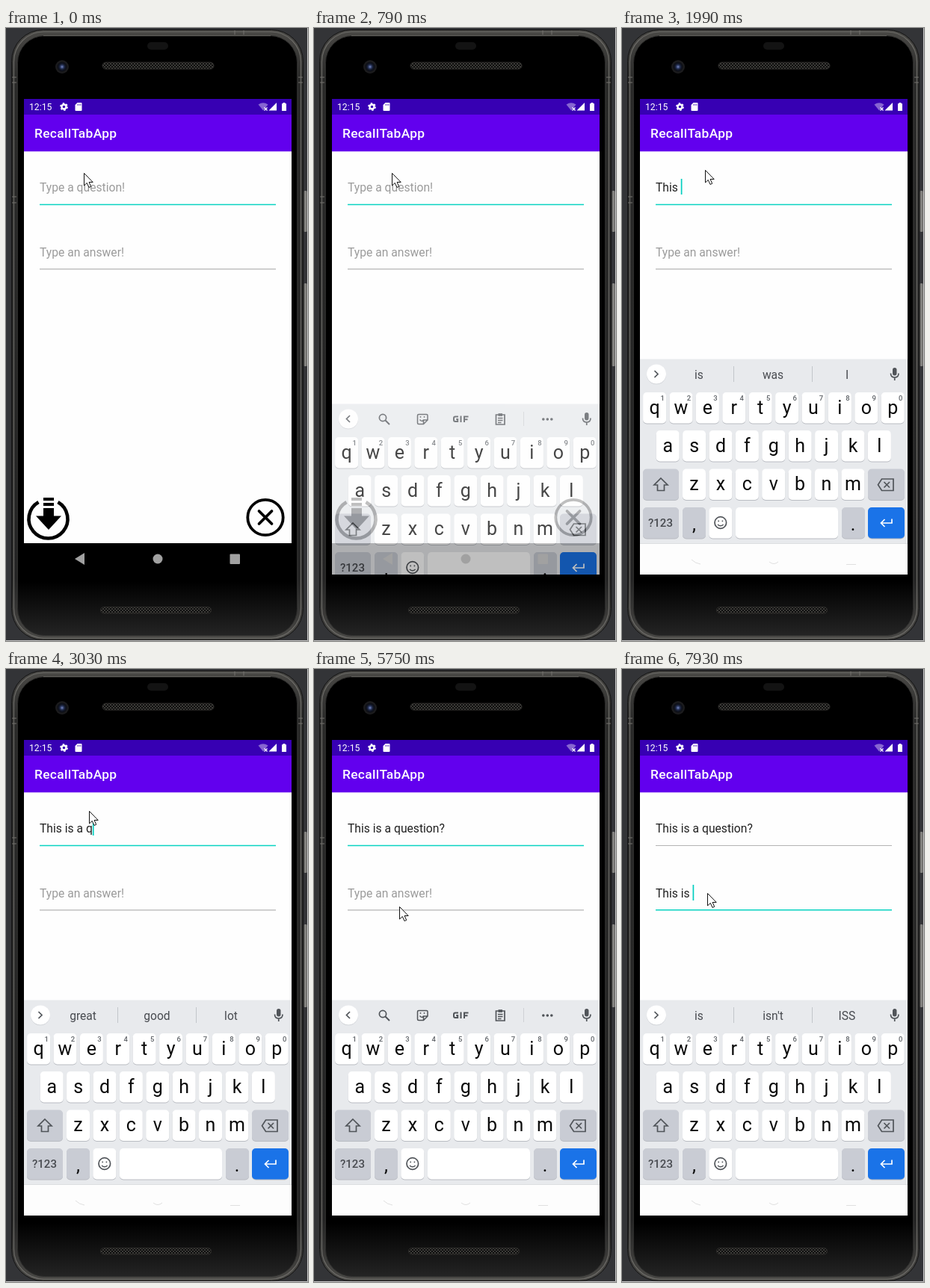
An HTML page for the animation above (8 s loop, 404 by 821 pixels).

```html
<!DOCTYPE html>
<html lang="en">
<head>
<meta charset="utf-8">
<title>Flash card entry</title>
<style>
html, body { margin: 0; width: 100%; height: 100%; overflow: hidden; background: #333437; }
svg { display: block; width: 404px; height: 821px; }
text { font-family: Roboto, "Noto Sans", sans-serif; white-space: pre; }
.field { font-size: 15.68px; }
.key { font-size: 25px; text-anchor: middle; fill: #0a0a0a; }
.digit { font-size: 9.5px; font-weight: 500; text-anchor: middle; fill: #5f6368; }
.word { font-size: 15.6px; text-anchor: middle; fill: #484b50; }
.word.long { font-size: 14px; letter-spacing: -.3px; }
.line { fill: none; stroke: #505459; stroke-width: 1.7; }
</style>
</head>
<body>
<svg viewBox="0 0 404 821">
  <defs>
    <linearGradient id="rim" x2="0" y2="1">
      <stop offset="0" stop-color="#4a4946"/>
      <stop offset=".08" stop-color="#2b2b2a"/>
      <stop offset=".9" stop-color="#252525"/>
      <stop offset="1" stop-color="#4a4946"/>
    </linearGradient>
    <linearGradient id="glass" x2="0" y2="1">
      <stop offset="0" stop-color="#000"/>
      <stop offset=".91" stop-color="#000"/>
      <stop offset="1" stop-color="#242424"/>
    </linearGradient>
    <linearGradient id="button" x2="1" y2="0">
      <stop offset="0" stop-color="#3c3c3b"/>
      <stop offset=".5" stop-color="#8f8e8b"/>
      <stop offset="1" stop-color="#5d5d5b"/>
    </linearGradient>
    <radialGradient id="lens">
      <stop offset="0" stop-color="#7f8fc4"/>
      <stop offset=".3" stop-color="#34426f"/>
      <stop offset=".6" stop-color="#141a2c"/>
      <stop offset="1" stop-color="#0a0b10"/>
    </radialGradient>
    <pattern id="mesh" width="4" height="4" patternUnits="userSpaceOnUse">
      <rect width="4" height="4" fill="#0d0d0d"/>
      <path d="M0 0L4 4M4 0L0 4" stroke="#474642" stroke-width=".8"/>
    </pattern>
    <clipPath id="screen"><rect x="24" y="95" width="358" height="637"/></clipPath>
  </defs>

  <!-- phone -->
  <rect width="404" height="821" fill="#333437"/>
  <g fill="url(#button)">
    <rect x="398" y="218" width="5" height="55" rx="1.5"/>
    <rect x="398" y="342" width="5" height="111" rx="1.5"/>
  </g>
  <rect x="7.5" y="2.5" width="390" height="817" rx="42" fill="url(#rim)" stroke="#131313"/>
  <rect x="10.5" y="5" width="384" height="812" rx="40" fill="none" stroke="#6b6a66" stroke-width="1.2"/>
  <rect x="15.5" y="10.5" width="374" height="803" rx="36" fill="url(#glass)" stroke="#2c2c2b"/>
  <path d="M50 10.500H354" stroke="#5c5b57"/>
  <path d="M8 66h6m-6 7h6M8 226h6m-6 8h6M391 66h6m-6 7h6M306 3v6m12-6v6" stroke="#74736f"/>
  <path d="M403.500 0V820.500H0" fill="none" stroke="#c6c6c6"/>
  <rect x="189" y="19" width="28" height="10" rx="5" fill="#131313"/>
  <circle cx="75" cy="52" r="9" fill="#1b1b1d"/>
  <circle cx="75" cy="52" r="6.5" fill="url(#lens)"/>
  <g fill="url(#mesh)" stroke="#2e2d2b">
    <rect x="129" y="46" width="149" height="9" rx="4.5"/>
    <rect x="126.500" y="775.500" width="148" height="8.500" rx="4.200"/>
  </g>

  <!-- app -->
  <rect x="24" y="95" width="358" height="595" fill="#fefefe"/>
  <rect x="24" y="95" width="358" height="21" fill="#3700b3"/>
  <rect x="24" y="116" width="358" height="49.300" fill="#6200ee"/>
  <g fill="#fff">
    <text x="31" y="110" font-size="12.2">12:15</text>
    <circle cx="77.500" cy="105.500" r="3" fill="none" stroke="#fff" stroke-width="2.400"/>
    <circle cx="77.500" cy="105.500" r="4.600" fill="none" stroke="#fff" stroke-width="1.600" stroke-dasharray="2.400 2.417"/>
    <path d="M95.500 100h5q1 0 1 1v9q0 1-1 1h-7q-1 0-1-1v-7z"/>
    <path d="M95.800 101.800v2m2-2v2m2-2v2" stroke="#3700b3" stroke-width=".8"/>
    <path d="M337.500 102.500q6.500-4.500 13 0l-6.500 8z" opacity=".4"/>
    <path d="M345.500 106.500l4 4m0-4l-4 4" stroke="#fff" stroke-width="1.200"/>
    <path d="M362 100v10.500h-10.500z"/>
    <path d="M370.500 100h3v1.200h1.500v9.800h-6v-9.800h1.500z"/>
    <text x="38" y="147" font-size="17.4" font-weight="500" letter-spacing=".3">RecallTabApp</text>
  </g>
  <g id="fields"></g>
  <g fill="none" stroke="#000">
    <path d="M43.500 635A26 26 0 1 0 69.500 635" stroke-width="4.600"/>
    <circle cx="347" cy="655.500" r="23.700" stroke-width="3.800"/>
    <path d="M338.500 647l17 17m0-17l-17 17" stroke-width="3.800" stroke-linecap="round"/>
  </g>
  <path d="M50 629h14v4h-14zM50 636h14v4h-14zM50 643h14v10.500h10L57 672 40 653.500h10z"/>

  <!-- keyboard -->
  <g clip-path="url(#screen)">
    <g id="board">
      <rect x="24" y="443.500" width="358" height="247" fill="#e8eaed"/>
      <rect x="24" y="690" width="358" height="300" fill="#fdfdfd"/>
      <path d="M24 690.500H382" stroke="#dcdee1"/>
      <path d="M93 712q5 5 12 6M197 715q6 5 12 0M300 718.500h13" fill="none" stroke="#e0e0e0"/>
      <circle cx="46" cy="464.200" r="13" fill="#c9ccd1"/>
      <circle cx="46" cy="463.500" r="13" fill="#fff"/>
      <path id="chevron" class="line"/>
      <g id="tools" class="line">
        <circle cx="92" cy="462" r="4.600"/>
        <path d="M95.500 465.500l5.500 5.500" stroke-width="2"/>
        <path d="M140 457.500h10.500q1.500 0 1.500 1.500v6l-5.500 5.500h-6.500q-1.500 0-1.500-1.500v-10q0-1.500 1.500-1.500zM152 465h-5.500v5.500M141.500 464.500q3 3.500 5 .5M142.500 460v1.800m5-1.800v1.800" stroke-width="1.500"/>
        <path d="M193 460.500h-4q-2 0-2 2v2.500q0 2 2 2h3.200v-3h-2M196.500 459.500v8.500M201 468v-7.500h5.500M201 464.300h4.500" stroke-width="2"/>
        <path d="M243.500 458h11.500v13h-11.500zM246 462.500h6.500m-6.500 3h6.500m-6.500 3h4.500"/>
        <path d="M246.500 458h5.500" stroke-width="3.600"/>
        <path d="M280.500 454v19" stroke="#cfd1d5" stroke-width="1"/>
        <path d="M306.800 464h.01m5.500 0h.01m5.500 0h.01" stroke-width="3.600" stroke-linecap="round"/>
      </g>
      <g id="words">
        <path d="M149.500 453v21m105-21v21" stroke="#c3c6ca"/>
        <text class="word" x="103" y="469.500"></text>
        <text class="word" x="202" y="469.500"></text>
        <text class="word" x="301" y="469.500"></text>
      </g>
      <rect x="362" y="455" width="5.500" height="10.500" rx="2.750" fill="#505459"/>
      <path class="line" d="M359.500 462.500q0 5.500 5.250 5.500t5.250-5.500M364.750 468v4"/>
      <g id="keys"></g>
      <g class="line">
        <path d="M52 603l9 9h-4.500v7.500h-9v-7.500h-4.500z"/>
        <path d="M347.500 604h15.500v15.500h-15.500l-5-7.750zM350.500 608l7.500 7.500m0-7.500l-7.500 7.500"/>
        <circle cx="131.800" cy="662.500" r="7.800"/>
        <path d="M128 665q3.800 3.600 7.600 0M129.200 659.500v1.800m5.200-1.800v1.800" stroke-width="1.500"/>
        <path d="M361 657.500v5.500h-14.500m5-5l-5 5 5 5" stroke="#fff"/>
      </g>
      <text x="51.500" y="668" font-size="15" font-weight="500" text-anchor="middle" fill="#484b50">?123</text>
    </g>
  </g>
  <g id="nav" fill="#a1a1a1">
    <path d="M92 711l13-8v16z"/>
    <circle cx="203" cy="711" r="6.500"/>
    <rect x="299.500" y="704.500" width="13.500" height="13.500" rx="1"/>
  </g>
  <path id="mouse" d="M0 0V16.500L3.800 13 6.500 19 9.200 17.800 6.600 12H11.700Z" fill="#fff" stroke="#111"/>
</svg>
<script>
const LOOP = 8000;
const $ = id => document.getElementById(id);
const pen = document.createElement('canvas').getContext('2d');
const width = s => {
  pen.font = '15.68px Roboto, "Noto Sans", sans-serif';
  return pen.measureText(s).width;
};

function cap(x, y, w, fill = '#fff') {
  return `<rect x="${x}" y="${y + 1}" width="${w}" height="41.500" rx="5" fill="#b9bcc2"/>
    <rect x="${x}" y="${y}" width="${w}" height="41.500" rx="5" fill="${fill}"/>`;
}

function row(letters, cx, y, digits = '') {
  return [...letters].map((c, i) => {
    const x = cx + i * 35.4;
    const digit = digits ? `<text class="digit" x="${x + 10.5}" y="${y + 10.5}">${digits[i]}</text>` : '';
    return cap(x - 15.5, y, 31) + `<text class="key" x="${x}" y="${y + 28.5}">${c}</text>` + digit;
  }).join('');
}

const grey = '#c9ccd4';
$('keys').innerHTML =
  row('qwertyuiop', 43.6, 488, '1234567890') +
  row('asdfghjkl', 61.2, 539) +
  row('zxcvbnm', 96.5, 590.5) +
  cap(28, 590.5, 48, grey) + cap(329, 590.5, 49, grey) +
  cap(28, 642, 48, grey) + cap(81, 642, 31, grey) + cap(116.3, 642, 31) +
  cap(152, 642, 137) + cap(294, 642, 31, grey) + cap(329, 642, 49, '#1a73e8') +
  '<text class="key" x="96.500" y="672.500">,</text><text class="key" x="309" y="672.500">.</text>';

// Each field: text, baseline, rule and composing underline
const fields = [['Type a question!', 218.5, 236.5], ['Type an answer!', 305.5, 322.8]].map(([hint, base, rule]) => {
  const g = document.createElementNS('http://www.w3.org/2000/svg', 'g');
  g.innerHTML = `<text class="field" x="45" y="${base}"></text><path d="M45 ${rule}H361"/>
    <path stroke="#333"/><rect y="${base - 16.5}" width="1.700" height="21" fill="#03cfc0"/>`;
  $('fields').append(g);
  const [text, line, under, caret] = g.children;
  return (value, from, active, blink) => {
    text.textContent = value || hint;
    text.setAttribute('fill', value ? '#212121' : '#9b9b9b');
    line.setAttribute('stroke', active ? '#08d3c1' : '#b4b4b4');
    line.setAttribute('stroke-width', active ? 1.5 : 1.2);
    const end = 45 + width(value);
    const start = 45 + width(value.slice(0, from));
    under.setAttribute('d', active && from >= 0 ? `M${start} ${base + 1.5}H${end}` : '');
    caret.setAttribute('x', end);
    caret.style.display = active && blink ? '' : 'none';
  };
});

// Each step changes part of the state and holds until the next one.
// q, a: field values; from: start of the underlined word; words: suggestions
const first = {
  q: '', a: '', from: -1, words: null, focus: 0, caret: 0,
  mouse: [104.5, 194.5], lift: 247, alpha: 0
};
const steps = [
  [130, { caret: 1 }],
  [530, { caret: 0 }],
  [670, { lift: 211, alpha: .14 }],
  [790, { lift: 60, alpha: .75 }],
  [940, { lift: 0, alpha: 1 }],
  [1060, { caret: 1 }],
  [1360, { q: 'T', mouse: [111.5, 190.5] }],
  [1480, { q: 'Th', from: 0, words: ['The', 'Th', 'This'] }],
  [1600, { q: 'Thi', words: ['This', 'Thi', 'Think'] }],
  [1720, { q: 'This', words: ['This', 'Thus', 'Thistle'] }],
  [1990, { q: 'This ', from: -1, words: ['is', 'was', 'I'] }],
  [2140, { q: 'This i' }],
  [2290, { q: 'This is', from: 5, words: ['is', "isn't", 'ISS'] }],
  [2440, { q: 'This is ', from: -1 }],
  [2580, { q: 'This is a', words: ['a', 'the', 'my'] }],
  [2730, { q: 'This is a ', words: ['a', 'an', 'as'] }],
  [2880, { words: ['great', 'good', 'lot'] }],
  [3030, { q: 'This is a q' }],
  [3340, { q: 'This is a qu', from: 10, words: ['quick', 'quite', 'question'] }],
  [3480, { q: 'This is a que', words: ['question', 'queen', 'questions'] }],
  [3630, { q: 'This is a ques', words: ['question', 'quest', 'questions'] }],
  [3770, { q: 'This is a quest', words: ['quest', 'question', 'questions'] }],
  [3920, { q: 'This is a questio', words: ['question', 'questions', 'questioned'] }],
  [4060, { q: 'This is a question', words: ['question', 'QUESTION', 'questionnaire'] }],
  [4590, { caret: 0 }],
  [4900, { q: 'This is a question?', from: -1, caret: 1 }],
  [5050, { words: null }],
  [5450, { mouse: [112.5, 215.5] }],
  [5590, { mouse: [113.5, 262.5], caret: 0 }],
  [5730, { mouse: [114.5, 318.5] }],
  [5870, { mouse: [115.5, 337.5] }],
  [6010, { mouse: [115.5, 322.5], focus: 1, caret: 1 }],
  [6150, { mouse: [114.5, 304.5] }],
  [6290, { mouse: [114.5, 300.5] }],
  [6570, { caret: 0 }],
  [6720, { a: 'T', caret: 1 }],
  [6870, { a: 'Th', from: 0, words: ['The', 'Th', 'This'] }],
  [6990, { a: 'Thi', words: ['This', 'Thi', 'Think'] }],
  [7110, { a: 'This', words: ['This', 'Thus', 'Thistle'] }],
  [7390, { a: 'This ', from: -1, words: ['is', 'was', 'I'] }],
  [7660, { a: 'This i' }],
  [7800, { a: 'This is', from: 5, words: ['is', "isn't", 'ISS'] }],
  [7930, { a: 'This is ', from: -1 }]
];

function draw(t) {
  const s = Object.assign({}, first, ...steps.filter(([at]) => at <= t).map(([, change]) => change));
  [s.q, s.a].forEach((value, i) => fields[i](value, s.from, s.focus === i, s.caret));
  $('board').setAttribute('transform', `translate(0 ${s.lift})`);
  $('board').setAttribute('opacity', s.alpha);
  $('nav').style.display = s.alpha < 1 ? '' : 'none';
  $('mouse').setAttribute('transform', `translate(${s.mouse})`);
  $('tools').style.display = s.words ? 'none' : '';
  $('words').style.display = s.words ? '' : 'none';
  $('chevron').setAttribute('d', s.words ? 'M43.500 459l4.500 4.500-4.500 4.500' : 'M48 459l-4.500 4.500 4.500 4.500');
  document.querySelectorAll('.word').forEach((node, i) => {
    const word = s.words ? s.words[i] : '';
    node.textContent = word;
    node.classList.toggle('long', word.length > 11);
  });
}

const start = performance.now();
function tick() {
  draw((performance.now() - start) % LOOP);
  requestAnimationFrame(tick);
}
tick();
</script>
</body>
</html>
```
